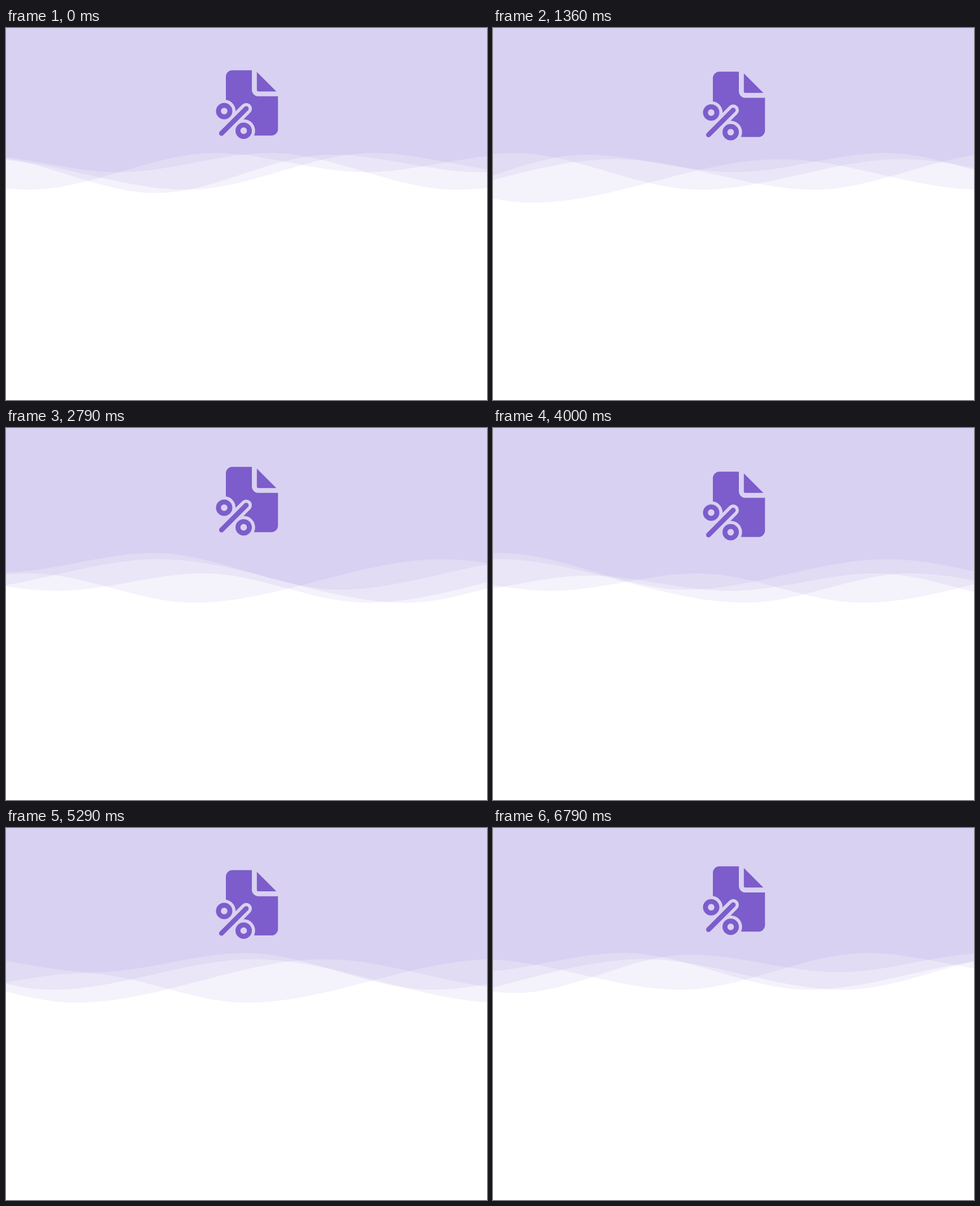
Write an HTML page with a canvas that moves like this. It is 851 px wide and 658 px high and loops after 6.88 s.

```html
<!DOCTYPE html>
<html lang="en">
<head>
<meta charset="utf-8">
<title>Waves</title>
<style>
  html, body { margin: 0; width: 100%; height: 100%; overflow: hidden; background: #fff; }
  canvas { display: block; }
</style>
</head>
<body>
<canvas id="stage" width="851" height="658"></canvas>
<script>
const W = 851, H = 658;
const LOOP = 6880, STEP = LOOP / 96.26;
const TURN = 3770;
const PURPLE = '#7c5dcb';

const ctx = document.getElementById('stage').getContext('2d');
const layer = document.createElement('canvas');
layer.width = W;
layer.height = 215;
const ink = layer.getContext('2d');

// Crests and troughs of the shared wave line
const line = [
  [-310, 227], [0, 292], [310, 224], [575, 255], [840, 221], [1170, 286], [1525, 232],
  [1965, 309], [2255, 257], [2515, 288], [2765, 261], [3020, 292]
];

// dir -1 mirrors the line; each layer slides out, then back at TURN
const waves = [
  { dir: 1, start: -373, speed: -0.317 },
  { dir: 1, start: 265, speed: -0.303 },
  { dir: -1, start: 1210, speed: 0.39 },
  { dir: -1, start: 1490, speed: 0.4 }
];

function drawWave(w, t) {
  const run = TURN - Math.abs(TURN - t);
  const shift = w.start + w.speed * run;
  const at = u => shift + w.dir * u;
  let [u, y] = line[0];
  ctx.beginPath();
  ctx.moveTo(at(u), 0);
  ctx.lineTo(at(u), y);
  for (const [u2, y2] of line.slice(1)) {
    const d = (u2 - u) / 3;
    ctx.bezierCurveTo(at(u + d), y, at(u2 - d), y2, at(u2), y2);
    u = u2;
    y = y2;
  }
  ctx.lineTo(at(u), 0);
  ctx.fill();
}

function disc(x, y, r) {
  ink.beginPath();
  ink.arc(x, y, r, 0, Math.PI * 2);
  ink.fill();
}

function slash(width) {
  ink.lineWidth = width;
  ink.beginPath();
  ink.moveTo(381.3, 111.7);
  ink.lineTo(425, 68);
  ink.stroke();
}

function drawIcon(top) {
  const rings = [[386, 72.3], [420.5, 107]];
  ink.setTransform(1, 0, 0, 1, 0, 0);
  ink.clearRect(0, 0, W, layer.height);
  ink.translate(0, top);
  ink.fillStyle = ink.strokeStyle = PURPLE;
  ink.lineCap = 'round';

  // Sheet
  ink.beginPath();
  ink.moveTo(400.5, 0);
  ink.lineTo(435, 0);
  ink.lineTo(435, 34.7);
  ink.arcTo(435, 46.2, 446.5, 46.2, 11.5);
  ink.lineTo(481.2, 46.2);
  ink.arcTo(481.2, 115.5, 469, 115.5, 11.5);
  ink.lineTo(389, 115.5);
  ink.arcTo(389, 0, 400.5, 0, 11.5);
  ink.closePath();
  ink.fill();

  // Folded corner
  ink.beginPath();
  ink.moveTo(443.8, 3);
  ink.lineTo(478.3, 37.5);
  ink.lineTo(446.6, 37.5);
  ink.arcTo(443.8, 37.5, 443.8, 34.7, 2.8);
  ink.closePath();
  ink.fill();

  // Gap around the percent sign
  ink.globalCompositeOperation = 'destination-out';
  rings.forEach(([x, y]) => disc(x, y, 20.2));
  slash(20);
  ink.beginPath();
  ink.moveTo(381, 112);
  ink.lineTo(410, 83);
  ink.lineTo(420, 97);
  ink.lineTo(420, 120);
  ink.lineTo(381, 120);
  ink.fill();

  ink.globalCompositeOperation = 'source-over';
  rings.forEach(([x, y]) => disc(x, y, 14.5));
  slash(8.7);
  ink.globalCompositeOperation = 'destination-out';
  rings.forEach(([x, y]) => disc(x, y, 5.8));
  ink.globalCompositeOperation = 'source-over';
  ctx.drawImage(layer, 0, 0);
}

function frame(now) {
  const t = Math.floor((now % LOOP) / STEP) * STEP;
  ctx.fillStyle = '#fff';
  ctx.fillRect(0, 0, W, H);
  ctx.fillStyle = 'rgba(126, 100, 199, 0.083)';
  waves.forEach(w => drawWave(w, t));
  drawIcon(66.3 + 11.7 * Math.abs(Math.sin(Math.PI * (t - 535) / 2115)));
  requestAnimationFrame(frame);
}
requestAnimationFrame(frame);
</script>
</body>
</html>
```
